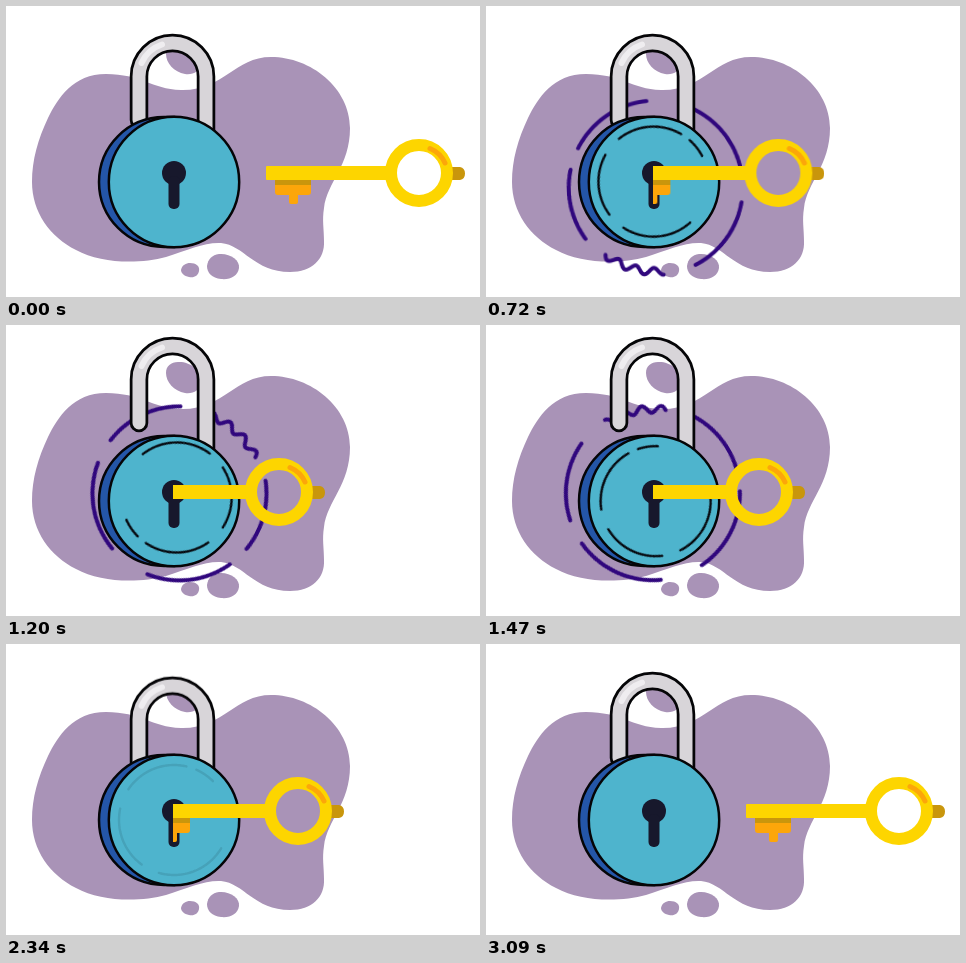
An HTML page for the animation above (3600 ms loop, 474 px wide and 291 px high).

```html
<!DOCTYPE html>
<html lang="en">
<head>
<meta charset="utf-8">
<title>Lock and key</title>
<style>
html, body { margin: 0; width: 100%; height: 100%; overflow: hidden; background: #fff; }
svg { display: block; width: 474px; height: 291px; }

.key, .shackle, .outer, .inner { animation: 3.6s infinite; }
.key { animation-name: key; animation-timing-function: cubic-bezier(.37, 0, .63, 1); }
.shackle { animation-name: shackle; animation-timing-function: cubic-bezier(.37, 0, .63, 1); }
.outer { animation-name: outer-turn, outer-fade; animation-timing-function: linear; transform-origin: 170px 174.5px; }
.inner { animation-name: inner-turn, inner-fade; animation-timing-function: linear; transform-origin: 169px 174px; }

@keyframes key {
  0% { transform: translateX(0); }
  4.72% { transform: translateX(7px); }
  20.56% { transform: translateX(-121px); }
  23.7% { transform: translateX(-121px); }
  30% { transform: translateX(-140px); }
  49% { transform: translateX(-140px); }
  56.4% { transform: translateX(-121px); }
  66.11% { transform: translateX(-121px); }
  80.83% { transform: translateX(7px); }
  85.83%, 100% { transform: translateX(0); }
}
@keyframes shackle {
  0%, 25% { transform: translateY(0); }
  30% { transform: translateY(-18px); }
  33.33%, 54.17% { transform: translateY(-16px); }
  56.11% { transform: translateY(-18px); }
  64.17% { transform: translateY(5px); }
  70%, 100% { transform: translateY(0); }
}
@keyframes outer-turn {
  0%, 11.11% { transform: rotate(0); animation-timing-function: cubic-bezier(.33, 0, .67, .71); }
  25.83% { transform: rotate(-174deg); animation-timing-function: cubic-bezier(.33, .42, .67, .73); }
  40.83% { transform: rotate(-300deg); animation-timing-function: cubic-bezier(.33, .45, .67, 1); }
  52.78%, 100% { transform: rotate(-360deg); }
}
@keyframes inner-turn {
  0%, 13.33% { transform: rotate(0); animation-timing-function: cubic-bezier(.33, 0, .67, .22); }
  25.83% { transform: rotate(71deg); animation-timing-function: cubic-bezier(.33, .25, .67, .82); }
  40.83% { transform: rotate(317deg); animation-timing-function: cubic-bezier(.33, .89, .67, 1); }
  52.78%, 100% { transform: rotate(360deg); }
}
@keyframes outer-fade {
  0%, 9% { opacity: 0; }
  14%, 47% { opacity: 1; }
  58.5%, 100% { opacity: 0; }
}
@keyframes inner-fade {
  0%, 10.5% { opacity: 0; }
  16%, 50.5% { opacity: 1; }
  66.7%, 100% { opacity: 0; }
}
</style>
</head>
<body>
<svg viewBox="0 0 474 291">
  <defs>
    <clipPath id="slot"><rect x="167" y="100" width="307" height="150"/></clipPath>
    <path id="bow" d="M133 114V70.5A33.5 33.5 0 0 1 200 70.5V150"/>
  </defs>

  <g fill="#a993b7">
    <path d="M100 68C67 68 52 92 42 112C32 133 26 154 26 176C26 206 44 231 70 244C95 258 134 258 160 251C182 244 199 236 215 237C238 239 248 266 284 266C306 266 319 253 318 235C318 222 316 215 318 202C321 176 344 160 344 122C344 82 305 51 265 51C228 51 218 85 175 84C145 83 135 68 100 68Z"/>
    <path d="M172 37C182 36 196 44 195 56C194 66 187 69 179 68C168 66 160 57 160 48C160 41 165 37 172 37Z"/>
    <path d="M184 257C190 257 194 260 193 265C192 270 188 272 183 271C178 270 175 267 175 264C176 259 180 257 184 257Z"/>
    <path d="M213 248C224 247 234 254 233 262C232 270 224 274 215 273C206 272 201 267 201 260C202 253 206 249 213 248Z"/>
  </g>

  <g class="outer" fill="none" stroke="#30077d" stroke-width="4" stroke-linecap="round" stroke-linejoin="round"></g>

  <g class="shackle" fill="none" stroke-linecap="round">
    <use href="#bow" stroke="#050507" stroke-width="18.5"/>
    <use href="#bow" stroke="#d8d5d9" stroke-width="13"/>
    <path d="M135.5 57A34 34 0 0 1 156 38.5" stroke="#efedf0" stroke-width="6"/>
  </g>

  <g stroke="#050507" stroke-width="2.5">
    <path d="M168 111H158A65 65 0 0 0 158 241H168Z" fill="#2456a8"/>
    <circle cx="168" cy="176" r="65.2" fill="#4eb4cd"/>
  </g>

  <g class="inner" fill="none" stroke="#060a10" stroke-width="2.4" stroke-linecap="round"></g>

  <g fill="#17182c">
    <circle cx="168" cy="167" r="12"/>
    <rect x="162.5" y="170" width="11" height="33" rx="5"/>
  </g>

  <g clip-path="url(#slot)">
    <g class="key">
      <path d="M269 174H305V186Q305 189 302 189H292V196Q292 198 290 198H285Q283 198 283 196V189H272Q269 189 269 186Z" fill="#fca60a"/>
      <path d="M269 174H305V179H269Z" fill="#c9960c"/>
      <path d="M444 161H454Q459 162 459 167.500Q459 173 454 174H444Z" fill="#c9960c"/>
      <path d="M261 160H383V174H261Q260 174 260 173V161Q260 160 261 160Z" fill="#fdd500"/>
      <circle cx="413" cy="167" r="28" fill="none" stroke="#fdd500" stroke-width="12"/>
      <path d="M424 142.500A28 28 0 0 1 439 157" fill="none" stroke="#fca60a" stroke-width="5" stroke-linecap="round"/>
    </g>
  </g>
</svg>
<script>
const OUTER = { x: 163, y: 174, r: 87 };
const INNER = { x: 168, y: 176, r: 55 };

// Path along a circle; angles in degrees, clockwise from the right.
function arc(c, from, to, wave = () => 0) {
  const steps = 60, points = [];
  for (let i = 0; i <= steps; i++) {
    const p = i / steps;
    const a = (from + (to - from) * p) * Math.PI / 180;
    const r = c.r + wave(p);
    points.push((c.x + r * Math.cos(a)).toFixed(2) + " " + (c.y + r * Math.sin(a)).toFixed(2));
  }
  return "M" + points.join("L");
}

function draw(selector, paths) {
  const path = document.createElementNS("http://www.w3.org/2000/svg", "path");
  path.setAttribute("d", paths.join(""));
  document.querySelector(selector).append(path);
}

const ripple = p => -3 + 3.6 * Math.sin(p * Math.PI * 6.5);
draw(".outer", [
  ...[[236, 284], [299, 356], [25, 85], [102, 155]].map(([a, b]) => arc(OUTER, a, b)),
  arc(OUTER, 219, 177, ripple)
]);
draw(".inner", [[214, 283], [294, 315], [126, 192], [31, 106]].map(([a, b]) => arc(INNER, a, b)));
</script>
</body>
</html>
```
